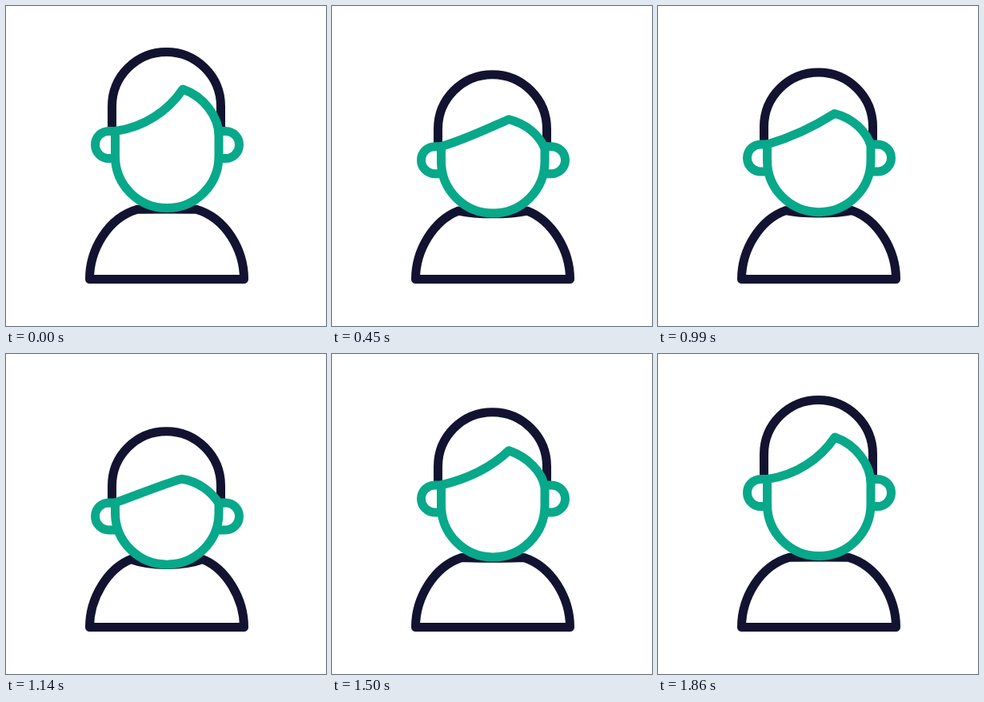
Write an HTML page without scripts that moves like this. It is 400 px wide and 400 px high and loops after 2070 ms.

```html
<!DOCTYPE html>
<html lang="en">
<head>
<meta charset="utf-8">
<title>Nodding avatar</title>
<style>
html, body { margin: 0; width: 100%; height: 100%; overflow: hidden; background: #fff; }
svg { display: block; width: 100%; height: 100%; }
path {
  fill: none;
  stroke: #121331;
  stroke-width: 11;
  stroke-linejoin: round;
  d: var(--rest);
  animation: nod 2070ms infinite;
}
.skin { stroke: #08a88a; }

/* each part lists its poses, from raised to lowest */
.body {
  --rest: path("M104.5 341.5C104.5 305 127 265 164 254.2C176 254 226 254 238 254.2C275 265 297.5 305 297.5 341.5Z");
  --up: var(--rest);
  --high: path("M104.5 341.5C104.5 305 127 266 162 254.5C178 255.5 224 255.5 240 254.5C275 266 297.5 305 297.5 341.5Z");
  --mid: path("M104.5 341.5C104.5 305 127 267 160 255.5C181 259.5 221 259.5 242 255.5C275 267 297.5 305 297.5 341.5Z");
  --low: path("M104.5 341.5C104.5 305 127 268 158 256C182 261 220 261 244 256C275 268 297.5 305 297.5 341.5Z");
  --down: path("M104.5 341.5C104.5 305 127 269 154.5 257C180 268 222 268 247.5 257C275 269 297.5 305 297.5 341.5Z");
}
.hair {
  --rest: path("M132.5 152v-26.5a68 68 0 0 1 136 0v26.5");
  --up: path("M132.5 148.5v-26.5a68 68 0 0 1 136 0v26.5");
  --high: path("M132.5 167.5v-26.5a68 68 0 0 1 136 0v26.5");
  --mid: path("M132.5 176v-26.5a68 68 0 0 1 136 0v26.5");
  --low: path("M132.5 180v-26.5a68 68 0 0 1 136 0v26.5");
  --down: path("M132.5 197v-26.5a68 68 0 0 1 136 0v26.5");
}
.ears {
  --rest: path("M136.5 156.5h-8a17 17 0 0 0 0 34h8M266 156.5h8.5a17 17 0 0 1 0 34h-8.5");
  --up: path("M136.5 152.5h-8a17 17 0 0 0 0 34h8M266 152.5h8.5a17 17 0 0 1 0 34h-8.5");
  --high: path("M136.5 164h-8a17 17 0 0 0 0 34h8M266 164h8.5a17 17 0 0 1 0 34h-8.5");
  --mid: path("M136.5 171.5h-8a17 17 0 0 0 0 34h8M266 171.5h8.5a17 17 0 0 1 0 34h-8.5");
  --low: path("M136.5 175.5h-8a17 17 0 0 0 0 34h8M266 175.5h8.5a17 17 0 0 1 0 34h-8.5");
  --down: path("M136.5 191.5h-8a17 17 0 0 0 0 34h8M266 191.5h8.5a17 17 0 0 1 0 34h-8.5");
}
.face {
  --rest: path("M136.5 156.5C172 152 203 131 221 104C247 113 266 138 266 162V187.75A64.75 64.75 0 0 1 136.5 187.75Z");
  --up: path("M136.5 152.5C172 149 203 127 221 98C247 107 266 133 266 158V186.75A64.75 64.75 0 0 1 136.5 186.75Z");
  --high: path("M136.5 164C170 156 200 141 221 121C245 129 263 148 266 167V189.25A64.75 64.75 0 0 1 136.5 189.25Z");
  --mid: path("M136.5 171.5C168 163 197 148 221 132C244 138 261 155 266 173V192.25A64.75 64.75 0 0 1 136.5 192.25Z");
  --low: path("M136.5 175.5C166 167 195 153 221 141.5C243 147 259 161 266 178V194.25A64.75 64.75 0 0 1 136.5 194.25Z");
  --down: path("M136.5 191.5C168 179 200 167 219 165.5C240 167 257 181 266 192V200.75A64.75 64.75 0 0 1 136.5 200.75Z");
}
@keyframes nod {
  0% { d: var(--rest); animation-timing-function: ease-in-out; }
  7.25% { d: var(--up); animation-timing-function: cubic-bezier(.4, 0, .7, .55); }
  21.74% { d: var(--low); animation-timing-function: cubic-bezier(.3, .42, .6, 1); }
  28.99% { d: var(--down); animation-timing-function: cubic-bezier(.4, 0, .6, 1); }
  44.93% { d: var(--mid); animation-timing-function: cubic-bezier(.4, 0, .6, 1); }
  60.87% { d: var(--down); animation-timing-function: cubic-bezier(.45, 0, .75, .6); }
  72.46% { d: var(--high); animation-timing-function: cubic-bezier(.3, .48, .6, 1); }
  81.16% { d: var(--up); animation-timing-function: ease-in-out; }
  89.86%, 100% { d: var(--rest); }
}
</style>
</head>
<body>
<svg viewBox="0 0 400 400">
  <path class="body"/>
  <path class="hair"/>
  <path class="skin ears"/>
  <path class="skin face"/>
</svg>
</body>
</html>
```
